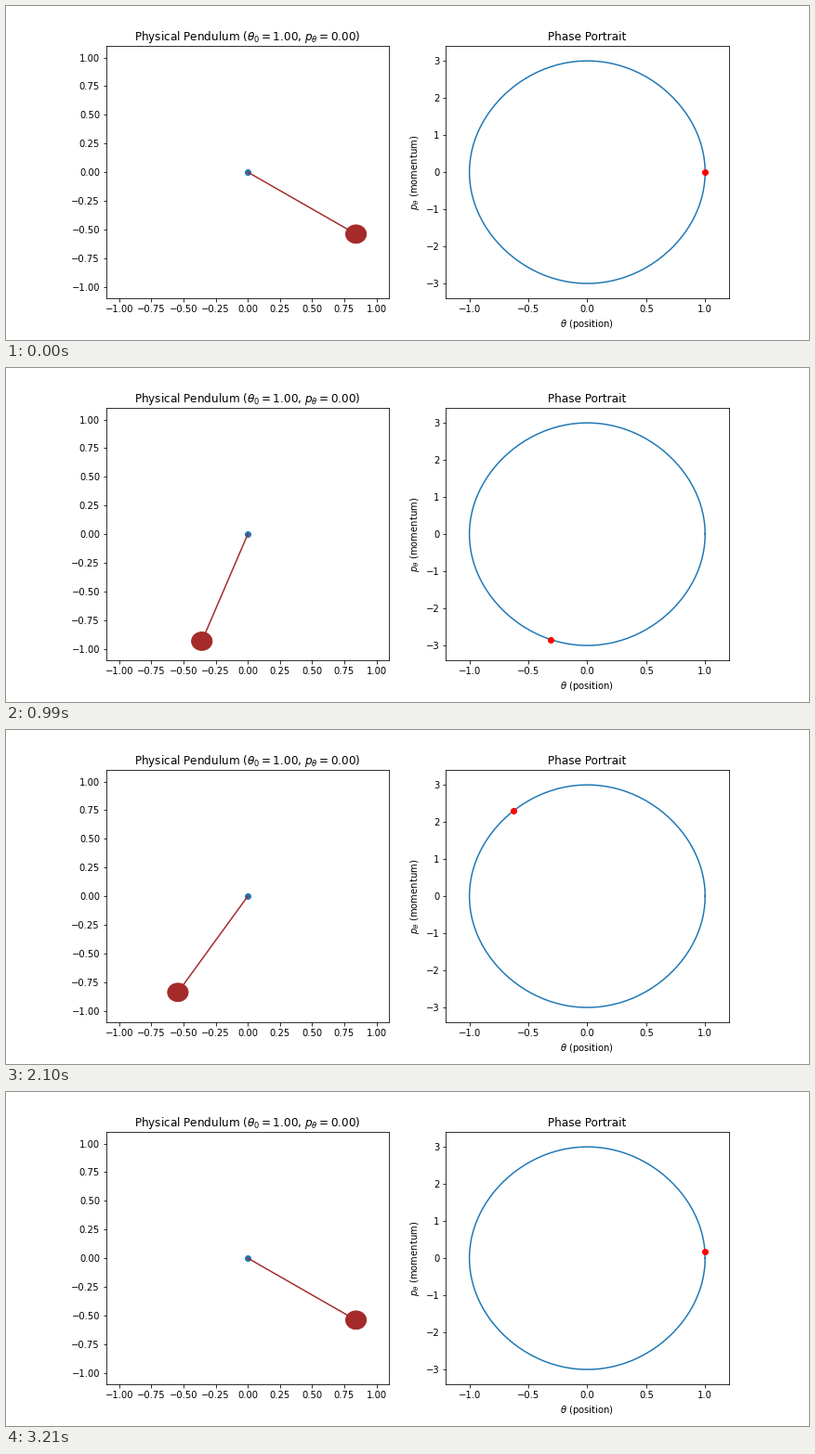
A matplotlib script for the animation above (3.24 s loop, 864x360 px).

```python
import numpy as np
import matplotlib.pyplot as plt
from matplotlib.animation import FuncAnimation
from matplotlib.patches import Circle

G = 9.8
DT = 0.02
FRAMES = 108
THETA0, P0 = 1.0, 0.0


def deriv(s):
    theta, p = s
    return np.array([p, -G * np.sin(theta)])


def rk4(s, h):
    k1 = deriv(s)
    k2 = deriv(s + h / 2 * k1)
    k3 = deriv(s + h / 2 * k2)
    k4 = deriv(s + h * k3)
    return s + h / 6 * (k1 + 2 * k2 + 2 * k3 + k4)


states = [np.array([THETA0, P0])]
for _ in range(FRAMES - 1):
    states.append(rk4(states[-1], DT))
path = np.array(states)

fig, (ax, phase) = plt.subplots(1, 2, figsize=(12, 5), dpi=72, facecolor="white")
fig.subplots_adjust(left=0.125, right=0.9, bottom=0.125, top=0.88, wspace=0.2)

# Physical space
ax.set_xlim(-1.1, 1.1)
ax.set_ylim(-1.1, 1.1)
ax.set_title(rf"Physical Pendulum ($\theta_0={THETA0:.2f}$, $p_\theta={P0:.2f}$)")
ax.scatter([0], [0], color="C0")
rod, = ax.plot([], [], color="brown")
bob = ax.add_patch(Circle((0, -1), 0.08, color="brown"))

# Phase space
phase.set_xlim(-1.2, 1.2)
phase.set_ylim(-3.4, 3.4)
phase.set_title("Phase Portrait")
phase.set_xlabel(r"$\theta$ (position)")
phase.set_ylabel(r"$p_\theta$ (momentum)")
phase.plot(path[:, 0], path[:, 1], color="C0")
dot, = phase.plot([], [], "ro")


def update(i):
    theta = path[i, 0]
    x, y = np.sin(theta), -np.cos(theta)
    rod.set_data([0, x], [0, y])
    bob.center = (x, y)
    # the phase marker trails the bob by one step
    q, p = path[max(i - 1, 0)]
    dot.set_data([q], [p])
    return rod, bob, dot


anim = FuncAnimation(fig, update, frames=FRAMES, interval=30, repeat=True,
                     repeat_delay=0, blit=False)
plt.show()
```
